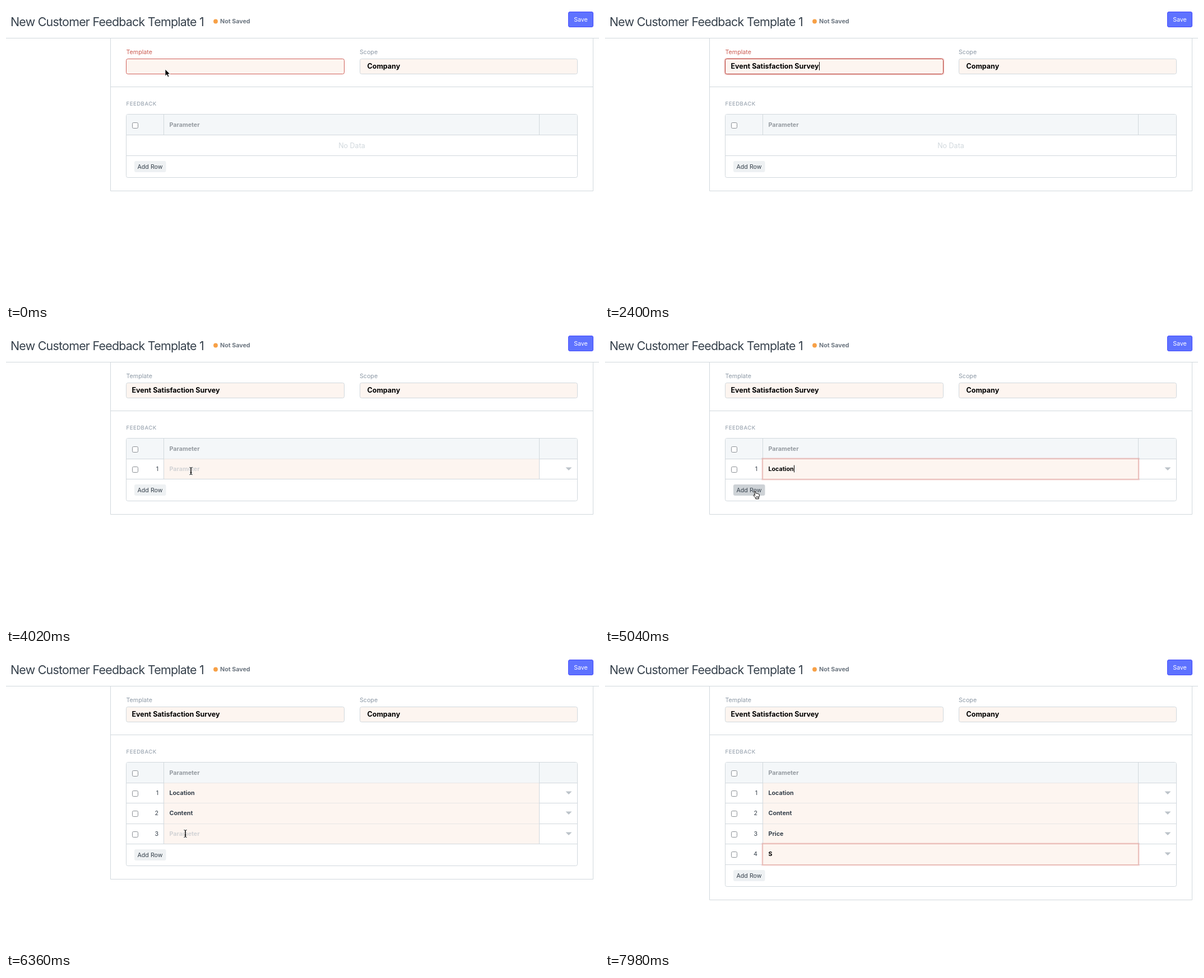
Recreate the animation shown at these times as an HTML page. Size 1058 by 529 pixels, loop 8000 ms.

```html
<!DOCTYPE html>
<html lang="en">
<head>
<meta charset="utf-8">
<title>Feedback template form</title>
<style>
html, body { margin: 0; width: 100%; height: 100%; overflow: hidden; background: #fff; }
svg { display: block; width: 1058px; height: 529px; }
text { font: 10.7px Inter, "Open Sans", sans-serif; font-optical-sizing: none; white-space: pre; }
.title { font-size: 21.4px; letter-spacing: -.75px; }
.bold { font-weight: 700; }
.input { font-size: 12.5px; font-weight: 700; }
.big { font-size: 12.5px; }
.caps { font-size: 9.6px; letter-spacing: .5px; }
</style>
</head>
<body>
<svg id="stage" viewBox="0 0 1058 529"></svg>
<script>
const LOOP = 8000;
const LINE = '#d1d8dd', INK = '#36414c', GREY = '#8d99a6', PEACH = '#fdf5f0', RED = '#c9463f';
const stage = document.getElementById('stage');
const pen = document.createElement('canvas').getContext('2d');

const template = { text: 'Event Satisfaction Survey', focus: 180, blur: 3480, start: 300, gap: 58 };
const rows = [
  { text: 'Location', add: 3480, focus: 4140, blur: 5160, start: 4260, gap: 60 },
  { text: 'Content', add: 5160, focus: 5370, blur: 6180, start: 5430, gap: 50 },
  { text: 'Price', add: 6180, focus: 6390, blur: 7260, start: 6480, gap: 60 },
  { text: 'S', add: 7260, focus: 7620, blur: 9000, start: 7920, gap: 60 }
];

// Pointer stops: time, x, y
const stops = [
  [0, 284, 113], [2460, 284, 113], [2880, 272, 334], [3180, 266, 288], [3540, 266, 288],
  [3960, 330, 252], [4800, 330, 252], [5040, 266, 288], [5190, 266, 288],
  [5340, 320, 284], [5880, 320, 284], [6120, 266, 324], [6210, 266, 324],
  [6360, 320, 321], [6840, 320, 321], [7080, 264, 361], [7290, 264, 361],
  [7560, 320, 358], [8000, 320, 358]
];
const hidden = [[300, 2460], [4260, 4800], [5430, 5880], [6480, 6840], [7920, 8000]];

const rect = (x, y, w, h, fill, stroke = 'none', r = 0) =>
  `<rect x="${x}" y="${y}" width="${w}" height="${h}" rx="${r}" fill="${fill}" stroke="${stroke}"/>`;
const path = (d, fill = 'none', stroke = LINE, extra = '') =>
  `<path d="${d}" fill="${fill}" stroke="${stroke}" ${extra}/>`;
const text = (x, y, s, fill, cls = '', anchor = 'start') =>
  `<text x="${x}" y="${y}" fill="${fill}" class="${cls}" text-anchor="${anchor}">${s}</text>`;
const checkbox = y => rect(225.5, y, 10, 10, '#fff', '#8a8f94', 2);
const glow = (x, y, w, h, r) => [5, 3].map(s =>
  `<rect x="${x}" y="${y}" width="${w}" height="${h}" rx="${r}" fill="none" stroke="${RED}" stroke-width="${s}" opacity=".12"/>`).join('');

const focused = (f, t) => t >= f.focus && t < f.blur;
const typed = (f, t) => f.text.slice(0, Math.max(0, Math.floor((t - f.start) / f.gap) + 1));

function caret(f, t, x, y, size) {
  if (!focused(f, t) || Math.floor(t / 500) % 2) return '';
  pen.font = `700 ${size}px Inter, "Open Sans", sans-serif`;
  const end = Math.round(x + pen.measureText(typed(f, t)).width) + .5;
  return path(`M${end} ${y - size * .6}v${size * 1.2}`, 'none', '#000');
}

function pointerAt(t) {
  const i = Math.max(1, stops.findIndex(s => s[0] > t));
  const [t0, x0, y0] = stops[i - 1], [t1, x1, y1] = stops[i];
  const k = (t - t0) / (t1 - t0), e = k * k * (3 - 2 * k);
  return { x: x0 + (x1 - x0) * e, y: y0 + (y1 - y0) * e,
           shown: !hidden.some(([a, b]) => t >= a && t < b) };
}

const cursors = {
  arrow: path('M0 0V12.2L2.9 9.6L4.8 14L6.9 13.1L5 8.8H8.8Z', '#000', '#fff', 'stroke-width=".8"'),
  hand: path('M0 .8C0-.6 2-.6 2.3 .8L3 4.2C3.8 3.3 5 3.6 5.2 4.5C6 3.9 7.1 4.2 7.3 5.1C8.2 4.7 9.3 5.3 9.3 6.4V9.3L8.2 11.6V13.8H2.8V12L-.6 8.6C-1.8 7.1-.2 6 .9 7.2L1.6 7.9Z',
    '#fff', '#000', 'stroke-linejoin="round"') + path('M4 9v3M5.7 9v3M7.3 9v3', 'none', '#000', 'stroke-width=".7"'),
  beam: path('M-2.5-6.5Q0-6.5 0-5V5Q0 6.5-2.5 6.5M2.5-6.5Q0-6.5 0-5V5Q0 6.5 2.5 6.5M-1.5 2.5h3', 'none', '#fff', 'stroke-width="2.4"') +
    path('M-2.5-6.5Q0-6.5 0-5V5Q0 6.5-2.5 6.5M2.5-6.5Q0-6.5 0-5V5Q0 6.5 2.5 6.5M-1.5 2.5h3', 'none', '#000')
};

function header() {
  return text(8, 36, 'New Customer Feedback Template 1', INK, 'title') +
    '<circle cx="374" cy="27.5" r="3.9" fill="#f7a046"/>' +
    text(382, 31, 'Not Saved', '#6c7680', 'bold') +
    rect(1003.5, 10.5, 44, 27, '#5e72ff', '#444bff', 2.5) +
    text(1025.5, 28, 'Save', '#fff', '', 'middle') +
    path('M0 57.5H1058');
}

function fields(t) {
  const error = t < template.blur, active = focused(template, t);
  return text(214.5, 86, 'Template', error ? '#cb5a50' : GREY) +
    text(631, 86, 'Scope', GREY) +
    (active ? glow(214.5, 94.5, 389, 27, 3) : '') +
    rect(214.5, 94.5, 389, 27, PEACH, error ? (active ? '#b5342d' : '#d0605a') : LINE, 3) +
    rect(631.5, 94.5, 388, 27, PEACH, LINE, 3) +
    text(224.5, 112, typed(template, t), '#000', 'input') +
    caret(template, t, 224.5, 107.5, 12.5) +
    text(644.5, 112, 'Company', '#000', 'input');
}

function row(r, i, t, top, bottom) {
  const value = typed(r, t), active = focused(r, t), base = top + 21.5;
  return rect(282, top, 669.5, bottom - top, PEACH) +
    path(`M215 ${bottom}H1019M281.5 ${top}V${bottom}M951.5 ${top}V${bottom}`) +
    checkbox(top + 14) +
    text(272, base, i + 1, INK, '', 'end') +
    (active ? glow(281.5, top, 670, bottom - top, 0) +
      rect(281.5, top, 670, bottom - top, PEACH, '#e3b0aa') : '') +
    text(291.5, base, value || 'Parameter', value ? (active ? '#000' : INK) : '#d2d3d5', 'bold') +
    caret(r, t, 291.5, top + 17.5, 10.7) +
    path(`M998.5 ${top + 15}h11l-5.5 5.5z`, '#bcc3c9', 'none');
}

function draw(t) {
  const live = rows.filter(r => t >= r.add), n = live.length;
  const edge = i => 230.5 + Math.round(36.45 * i);
  const end = n ? edge(n) : 267.5;
  const p = pointerAt(t);
  const inside = (x, y, w, h) => p.shown && p.x >= x && p.x <= x + w && p.y >= y && p.y <= y + h;
  const hover = inside(229, end + 9.5, 57, 20);
  const overInput = inside(214, 94, 390, 28) || (n && inside(282, 231, 669, end - 231));
  const kind = hover ? 'hand' : overInput && t >= 120 ? 'beam' : 'arrow';

  stage.innerHTML = header() +
    path(`M186.5 58V${end + 63}H1047.5V58M187 144.5H1047`) +
    fields(t) +
    text(214.5, 178, 'FEEDBACK', GREY, 'caps') +
    rect(214.5, 193.5, 805, end - 154.5, '#fff', LINE, 3) +
    rect(215, 194, 804, 36.5, '#f4f7f9', 'none', 2) +
    path('M215 230.5H1019M281.5 194V230M951.5 194V230') +
    checkbox(208.5) +
    text(291.5, 215.5, 'Parameter', '#959ba1', 'bold') +
    (n ? live.map((r, i) => row(r, i, t, edge(i), edge(i + 1))).join('')
       : text(617, 253.5, 'No Data', '#d1d8dd', 'big', 'middle') + path('M215 267.5H1019')) +
    rect(229, end + 9.5, 56.5, 20, hover ? '#cdd2d6' : '#eef1f3', 'none', 3) +
    text(257, end + 23.5, 'Add Row', INK, '', 'middle') +
    (p.shown ? `<g transform="translate(${p.x} ${p.y})">${cursors[kind]}</g>` : '');
}

function tick() {
  draw(performance.now() % LOOP);
  requestAnimationFrame(tick);
}
tick();
</script>
</body>
</html>
```
